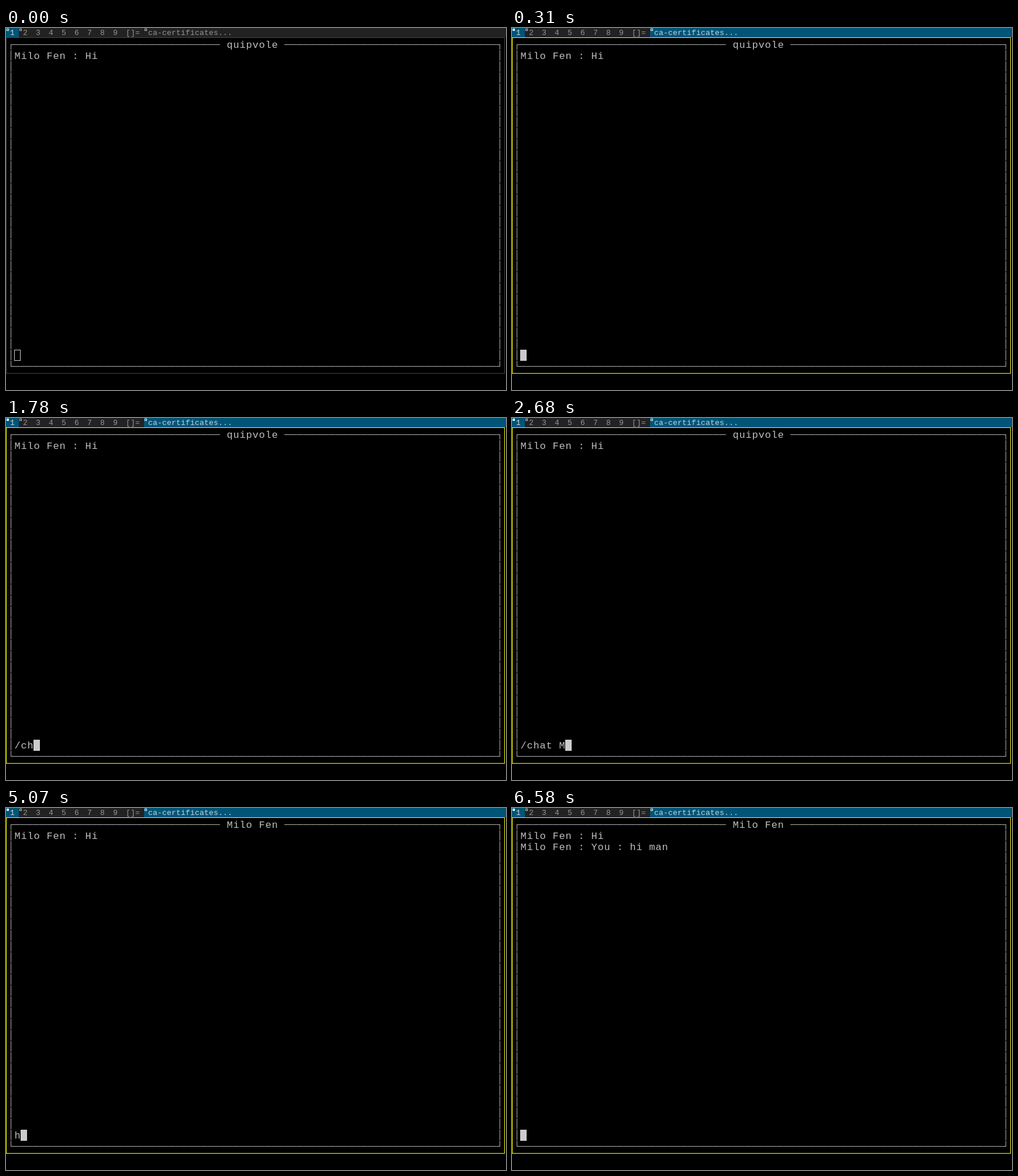
Write an HTML page with a canvas that moves like this. It is 855 px wide and 620 px high and loops after 8000 ms.

```html
<!DOCTYPE html>
<html lang="en">
<head>
<meta charset="utf-8">
<title>Terminal chat</title>
<style>
  html, body { margin: 0; width: 100%; height: 100%; overflow: hidden; background: #000; }
  canvas { display: block; }
</style>
</head>
<body>
<canvas id="stage" width="855" height="620"></canvas>
<script>
const ctx = document.getElementById('stage').getContext('2d');
const LOOP = 8000;
const CELL_W = 11, CELL_H = 19, LEFT = 3, TOP = 19, LAST_COL = 76, LAST_ROW = 29;
const FONT = '"Liberation Mono", monospace';
const CONTACT = 'Milo Fen';

const FOCUS = 260, CURSOR_ON = 310, OPEN_CHAT = 3450, SENT = 6580;

// Each command is typed one key at a time, then cleared by Enter.
const typing = [
  { text: '/chat Milo', keys: [920, 1160, 1780, 1940, 1990, 2130, 2680, 2890, 2990, 3150], enter: OPEN_CHAT },
  { text: 'hi man', keys: [5070, 5120, 5290, 5550, 5660, 5770], enter: 6080 }
];

function typedAt(t) {
  const line = typing.find(l => t >= l.keys[0] && t < l.enter);
  return line ? line.text.slice(0, line.keys.filter(k => k <= t).length) : '';
}

function rect(x, y, w, h, color) {
  ctx.fillStyle = color;
  ctx.fillRect(x, y, w, h);
}

function outline(x, y, w, h, color) {
  ctx.strokeStyle = color;
  ctx.lineWidth = 1;
  ctx.strokeRect(x + 0.5, y + 0.5, w - 1, h - 1);
}

function write(text, x, baseline, size, pitch, color) {
  ctx.font = `${size}px ${FONT}`;
  ctx.fillStyle = color;
  const inset = (pitch - size * 0.6) / 2;
  [...text].forEach((c, i) => ctx.fillText(c, x + i * pitch + inset, baseline));
}

const colX = col => LEFT + col * CELL_W;
const rowY = row => TOP + row * CELL_H;
const put = (text, col, row) => write(text, colX(col), rowY(row) + 15, 17, CELL_W, '#bebebe');
const label = (text, x, color) => write(text, x, 12, 13, 8, color);

function drawBar(focused) {
  const blue = '#005577', light = '#c6d6dc', dim = '#959595';
  rect(0, 0, 855, 16, '#222222');
  rect(0, 0, 22, 16, blue);
  for (let i = 0; i < 9; i++) label(String(i + 1), i * 22 + 7, i ? dim : light);
  label('[]=', 205, dim);
  if (focused) rect(236, 0, 619, 16, blue);
  label('ca-certificates...', 243, focused ? light : dim);
  if (focused) rect(1, 1, 4, 4, '#eeeeee');
  else outline(1, 1, 4, 4, '#eeeeee');
  outline(23, 1, 4, 4, '#bbbbbb');
  outline(237, 1, 4, 4, focused ? '#eeeeee' : '#bbbbbb');
}

function drawRule(row, from, to) {
  const y = rowY(row) + 9;
  for (let col = from; col <= to; col++) {
    rect(colX(col), y, CELL_W - 1, 1, '#b4b4b4');
    rect(colX(col) + CELL_W - 1, y, 1, 1, '#8c8c8c');
  }
}

function drawFrame() {
  drawRule(0, 1, 32);
  drawRule(0, 43, LAST_COL - 1);
  drawRule(LAST_ROW, 1, LAST_COL - 1);
  for (const col of [0, LAST_COL]) {
    const x = colX(col) + 5;
    for (let row = 1; row < LAST_ROW; row++) rect(x, rowY(row), 1, CELL_H - 1, '#b4b4b4');
    const start = col ? colX(col) : x;
    for (const row of [0, LAST_ROW]) {
      rect(start, rowY(row) + 9, 6, 1, '#b4b4b4');
      rect(x, rowY(row) + (row ? 0 : 9), 1, 9, '#b4b4b4');
    }
  }
}

function drawCursor(col, filled) {
  const x = colX(col), y = rowY(28);
  if (filled) rect(x, y, CELL_W, CELL_H, '#cccccc');
  else outline(x, y, CELL_W, CELL_H, '#cccccc');
}

function draw(t) {
  const focused = t >= FOCUS, typed = typedAt(t);
  rect(0, 0, 855, 620, '#000000');
  drawBar(focused);
  outline(0, 16, 853, 576, focused ? '#ffff00' : '#444444');
  drawFrame();
  put(t < OPEN_CHAT ? 'quipvole' : CONTACT, 34, 0);
  put(`${CONTACT} : Hi`, 1, 1);
  if (t >= SENT) put(`${CONTACT} : You : hi man`, 1, 2);
  put(typed, 1, 28);
  drawCursor(typed.length + 1, t >= CURSOR_ON);
}

const start = performance.now();
function tick() {
  draw((performance.now() - start) % LOOP);
  requestAnimationFrame(tick);
}
tick();
</script>
</body>
</html>
```
